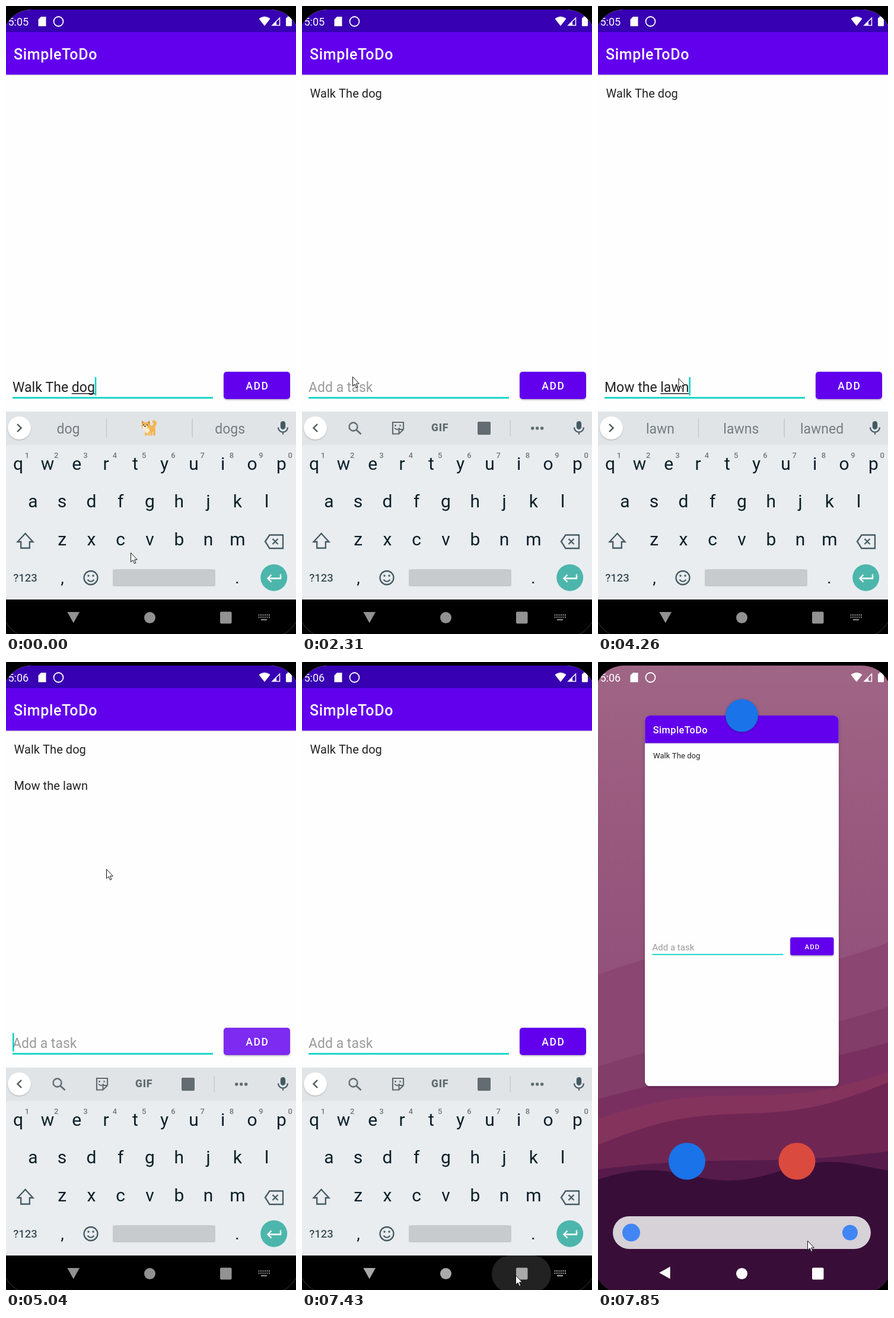
Recreate the animation shown at these times as an HTML page with a canvas. Size 489 by 1056 pixels, loop 8 s.

```html
<!DOCTYPE html>
<html lang="en">
<head>
<meta charset="utf-8">
<title>To-do list demo</title>
<style>
html, body { margin: 0; width: 100%; height: 100%; overflow: hidden; background: #000; }
canvas { display: block; width: 100vw; height: 100vh; }
</style>
</head>
<body>
<canvas id="stage" width="489" height="1056"></canvas>
<script>
const c = document.getElementById('stage').getContext('2d');
const W = 489, H = 1056, MID = 242.5, LOOP = 8000;
const PURPLE = '#6200ee', DARK = '#3700b3', TEAL = '#06d2c4';
const INK = '#455a64', GRAY = '#626c71', KEY = '#0b1f29', LINE = '#c3c8cb';

// Main events in ms
const ADD_DOG = 690, TYPE = 2870, MINUTE = 4530, ADD_LAWN = 4800;
const REMOVE = 6320, OVERVIEW = 7310, RECENTS = 7550;
const PRESSES = [540, 4650];
const TICK = 135, KEY_GAP = 140, BLINK = 525;

// Typed text and its suggestions, one stage per KEY_GAP; * marks bold
const STAGES = [
  ['M', 'M', '*My', 'Mom'],
  ['Mo', 'Mo', '*Mom', 'More'],
  ['Mow', 'Mow', 'Mowing', 'Mowed'],
  ['Mow t', 't', '*the', 'to'],
  ['Mow the', 'the', 'they', 'then'],
  ['Mow the l', 'l', '*lawn', 'last'],
  ['Mow the la', 'la', '*lawn', 'last'],
  ['Mow the lawn', 'lawn', 'lawns', 'lawned']
];
// Pointer moves: start, ticks, end point
const MOVES = [
  [150, 4, 409, 641], [810, 3, 85, 623], [4260, 4, 408, 640], [4900, 2, 169, 348],
  [5190, 5, 116, 203], [6620, 6, 360, 1031], [7685, 2, 353, 973]
];

const lerp = (a, b, u) => a + (b - a) * u;
const clamp = u => Math.max(0, Math.min(1, u));
const smooth = u => u * u * (3 - 2 * u);

function inputState(t) {
  if (t < ADD_DOG) return { typed: 'Walk The dog', words: ['dog', 'DOG', 'dogs'], since: 0 };
  if (t < TYPE) return { typed: '', since: ADD_DOG };
  if (t >= ADD_LAWN) return { typed: '', since: ADD_LAWN };
  const i = Math.min(STAGES.length - 1, Math.floor((t - TYPE) / KEY_GAP));
  const [typed, ...words] = STAGES[i];
  return { typed, words, since: TYPE + i * KEY_GAP };
}

function pointerAt(t) {
  let x = 210, y = 919;
  for (const [start, ticks, toX, toY] of MOVES) {
    const done = Math.floor((t - start) / TICK) + 1;
    const u = smooth(clamp(done / ticks));
    x = lerp(x, toX, u);
    y = lerp(y, toY, u);
  }
  return [x, y];
}

function rect(x, y, w, h, color) {
  c.fillStyle = color;
  c.fillRect(x, y, w, h);
}
function box(x, y, w, h, r, color) {
  c.beginPath();
  c.roundRect(x, y, w, h, r);
  c.fillStyle = color;
  c.fill();
}
function oval(x, y, rx, ry, color) {
  c.beginPath();
  c.ellipse(x, y, rx, ry, 0, 0, 2 * Math.PI);
  c.fillStyle = color;
  c.fill();
}
const dot = (x, y, r, color) => oval(x, y, r, r, color);
function ring(x, y, r, color, width) {
  c.beginPath();
  c.arc(x, y, r, 0, 2 * Math.PI);
  c.strokeStyle = color;
  c.lineWidth = width;
  c.stroke();
}
function fill(d, color) {
  c.fillStyle = color;
  c.fill(new Path2D(d));
}
function stroke(d, color, width) {
  c.strokeStyle = color;
  c.lineWidth = width;
  c.stroke(new Path2D(d));
}
function text(s, x, y, size, color, { weight = 400, align = 'left', gap = 0 } = {}) {
  c.font = `${weight} ${size}px Roboto, sans-serif`;
  c.letterSpacing = gap + 'px';
  c.textAlign = align;
  c.fillStyle = color;
  c.fillText(s, x, y);
}
function label(s, x, y, size, color, weight) {
  text(s, x, y, size, color, { weight, align: 'center' });
}
function withShadow(alpha, blur, dy, paint) {
  c.shadowColor = `rgba(0,0,0,${alpha})`;
  c.shadowBlur = blur;
  c.shadowOffsetY = dy;
  paint();
  c.shadowColor = 'transparent';
}

function statusBar(t) {
  text(t < MINUTE ? '5:05' : '5:06', 3.5, 33, 18, '#fff');
  fill('M59 18H67.5V34H54.5V22.5Z', '#fff');
  ring(88.5, 26, 8, '#fff', 1.8);
  fill('M436 33.5L426.5 21.5Q436 14 445.500 21.5Z', '#fff');
  stroke('M449 32.5H461.5V20Z', '#fff', 1.5);
  fill('M448 33L456 25V33Z', '#fff');
  box(472, 19.5, 10, 14.5, 1.5, '#fff');
  rect(474.5, 17.5, 5, 3, '#fff');
}

function inputField(t) {
  const { typed, since } = inputState(t);
  text(typed || 'Add a task', 11, 649, 23, typed ? '#212121' : '#9b9b9b');
  const widthOf = s => c.measureText(s).width;
  const end = 11 + widthOf(typed);
  if (typed) {
    const start = 11 + widthOf(typed.slice(0, typed.lastIndexOf(' ') + 1));
    rect(start, 651, end - start, 1.5, '#212121');
  }
  if ((t - since) % (2 * BLINK) < BLINK) rect(end, 624, 2.5, 31, TEAL);
  rect(11, 657.5, 338, 2.7, TEAL);
}

function addButton(t) {
  withShadow(.28, 3, 1.5, () => box(367, 615, 112, 46, 5, PURPLE));
  c.save();
  c.beginPath();
  c.roundRect(367, 615, 112, 46, 5);
  c.clip();
  for (const press of PRESSES) {
    const age = t - press;
    if (age < 0 || age > 690) continue;
    const alpha = .24 * clamp((690 - age) / 430);
    dot(409, 640, 40 + .6 * age, `rgba(255,255,255,${alpha})`);
  }
  c.restore();
  text('ADD', 404.3, 645, 17.5, '#fff', { weight: 500, gap: 1.56 });
}

function appContent(t) {
  rect(-60, 0, 610, 1100, '#fefefe');
  withShadow(.25, 2, 1, () => rect(-60, 44, 610, 71.4, PURPLE));
  rect(-60, 0, 610, 44, DARK);
  text('SimpleToDo', 13, 90, 25, '#fff', { weight: 500, gap: .65 });
  const items = [['Walk The dog', ADD_DOG, LOOP], ['Mow the lawn', ADD_LAWN, REMOVE]];
  items.forEach(([name, from, to], i) => {
    if (t >= from && t < to) text(name, 13.5, 154 + i * 61, 20, '#222', { gap: .06 });
  });
  inputField(t);
  addButton(t);
}

function dogIcon() {
  const fur = '#f2b653', pale = '#fff0d2', dark = '#392a20';
  c.lineCap = 'round';
  stroke('M249 707Q254 700 249 699', fur, 5);
  c.lineCap = 'butt';
  oval(243, 711, 9, 6, fur);
  for (let x = 236; x < 252; x += 4.7) box(x - 1.8, 712, 3.6, 10.5, 1.5, fur);
  oval(238, 713, 4, 5, pale);
  fill('M229 705V697L235 702ZM243 705L242 697L236 702Z', '#c98a35');
  oval(235.5, 705.5, 7, 6, fur);
  oval(234.5, 708, 4, 3.5, pale);
  for (const x of [232, 238]) dot(x, 704.5, 1, dark);
  dot(234.5, 706.8, 1.2, dark);
}

function suggestions(words) {
  words.forEach((word, i) => {
    const x = 105 + i * 136.3;
    if (i) rect(24 + i * 144.7, 694, 1.5, 31, LINE);
    if (word === 'DOG') dogIcon();
    else if (word[0] === '*') label(word.slice(1), x, 719, 23, '#000', 700);
    else label(word, x, 719, 23, '#747d82');
  });
}

function toolIcons() {
  ring(86.5, 707.5, 7, GRAY, 2.4);
  stroke('M91.5 712.5L99.5 720', GRAY, 2.8);
  stroke('M153 700H171V712L163.5 719.5H153ZM171 712H163.5V719.5', GRAY, 2.2);
  stroke('M156 709.5Q160 714.5 165 709.5', GRAY, 2);
  for (const x of [157.5, 165.5]) dot(x, 705.5, 1.4, GRAY);
  text('GIF', 218, 715, 17.5, GRAY, { weight: 900, gap: .8 });
  box(296, 699, 22, 22, 2, GRAY);
  rect(350.5, 696, 1.3, 28, LINE);
  for (let i = -1; i < 2; i++) dot(396.7 + i * 8, 710, 2.7, GRAY);
}

function keyIcons() {
  stroke('M32.5 887L45.5 901H39.8V911.5H25.2V901H19.5Z', INK, 2.3);
  stroke('M437 900.5L444.5 889.5H467V912H444.5ZM449.5 896L458.500 905M458.5 896L449.5 905', INK, 2.3);
  ring(143, 961.5, 11.5, INK, 2.3);
  for (const x of [139, 147]) dot(x, 958, 1.7, INK);
  stroke('M137.5 964.5Q143 971 148.5 964.5', INK, 2);
  dot(451.7, 961.2, 22.5, '#4db6ac');
  stroke('M463 955.5V962.5H442M447.5 956.5L441.5 962.5L447.5 968.5', '#fff', 2.4);
}

function keyboard(t, keysColor) {
  const { words } = inputState(t);
  rect(-10, 682, 520, 56, '#e1e4e7');
  rect(-10, 738, 520, 260, keysColor);
  withShadow(.25, 2, 1, () => dot(22.5, 709.5, 19.5, '#fff'));
  stroke(words ? 'M19 703L25.5 709.5L19 716' : 'M26 703L19.5 709.5L26 716', '#4c5559', 2.4);
  if (words) suggestions(words);
  else toolIcons();
  box(462.8, 698, 8.4, 14, 4.2, INK);
  stroke('M459 708.5a8 8 0 0 0 16 0M467 716.5V720.5', INK, 2.2);

  ['qwertyuiop', 'asdfghjkl', 'zxcvbnm'].forEach((letters, row) => {
    [...letters].forEach((key, i) => {
      const x = MID + (i - (letters.length - 1) / 2) * 49.3;
      label(key, x, 779.7 + row * 63.7, 30, KEY);
      if (row === 0) label((i + 1) % 10, x + 14.8, 759.5, 13, '#707a80', 500);
    });
  });
  label('?123', 32.5, 968, 18.5, '#3f5059', 500);
  label(',', 95, 971, 28, KEY);
  label('.', 390, 971, 28, KEY);
  box(180, 947, 173, 29, 3, '#c7cbce');
  keyIcons();
}

function navIcons(color, angle) {
  c.save();
  c.translate(113.7, 1027);
  c.rotate(angle);
  fill('M0 -10.500L10.3 8H-10.3Z', color);
  c.restore();
  dot(MID, 1028.5, 9.5, color);
  box(361, 1018.5, 19.5, 20, 2, color);
}

function navBar(t) {
  const pressed = t >= OVERVIEW;
  const color = pressed ? '#a9a9a9' : '#929292';
  rect(0, 998, W, 58, '#000');
  if (pressed) {
    const half = Math.min(50, 34 + (t - OVERVIEW) / 6);
    box(370 - half, 998, 2 * half, 62, 31, '#222');
  }
  navIcons(color, Math.PI);
  for (let i = 0; i < 12; i++) {
    rect(425.5 + i % 6 * 3.5, i < 6 ? 1023 : 1026.7, 2, 2, color);
  }
  rect(430, 1031, 10, 2, color);
}

// A hill line from the left height to the right one with a wave on it
function ridge(color, left, right, wave, turns) {
  c.beginPath();
  c.moveTo(0, H);
  for (let x = 0; x <= W + 4; x += 4) {
    const u = x / W;
    c.lineTo(x, lerp(left, right, u) - wave * Math.sin(u * turns * 2 * Math.PI));
  }
  c.lineTo(W, H);
  c.fillStyle = color;
  c.fill();
}

function wallpaper() {
  const sky = c.createLinearGradient(0, 0, 0, 560);
  sky.addColorStop(0, '#a06686');
  sky.addColorStop(.4, '#9a5b7f');
  sky.addColorStop(1, '#91507a');
  rect(0, 0, W, H, sky);
  ridge('#8b4771', 526, 472, 20, 1);
  ridge('#823e68', 680, 580, 8, 1);
  ridge('#793061', 735, 640, 6, 1);
  ridge('#84335c', 768, 690, 12, 1);
  ridge('#702653', 812, 707, 14, 1);
  ridge('#571b4b', 853, 823, 4, 1);
  ridge('#380e38', 870, 848, 12, 1.6);
}

function homeDock() {
  dot(150, 839.5, 31, '#1a73e8');
  dot(335.5, 839.5, 31, '#db4a3f');
  box(25, 932, 435, 55, 27.5, '#d7d1d8');
  dot(56, 959.5, 15, '#4285f4');
  dot(425, 959.5, 13, '#4285f4');
}

function recents(t) {
  // The card shrinks in two ticks, slowing down
  const rest = 1 - clamp(Math.floor((t - RECENTS) / 150) / 2);
  const fade = rest * rest, u = 1 - fade;
  const w = lerp(373, 326.5, u), x = MID - w / 2;
  const y = lerp(70, 90, u), h = lerp(803, 713, u) - y;
  const s = lerp(.749, .654, u), corner = lerp(5, 8, u);
  wallpaper();
  homeDock();

  withShadow(.2, 6, 2, () => box(x, y, w, h, corner, '#fefefe'));
  c.save();
  c.beginPath();
  c.roundRect(x, y, w, h, corner);
  c.clip();
  c.save();
  c.translate(lerp(60.6, 84.2, u), lerp(44.6, 60.9, u));
  c.scale(s, s);
  appContent(t);
  c.restore();
  c.save();
  c.globalAlpha = .68 * fade;
  c.translate(60.3, 59.3);
  c.scale(.749, .749);
  keyboard(t, '#fafafa');
  c.restore();
  c.globalAlpha = fade;
  rect(x, y + h - 12, w, 12, '#a9a9ab');
  c.restore();

  if (u) withShadow(.3, 4, 1, () => dot(MID, y, 27.5 * u, '#1a73e8'));
  box(313, 998, 115, 64, 31, `rgba(255,255,255,${.12 * rest})`);
  navIcons('#fff', -u * Math.PI / 2);
}

function pointer(t) {
  const [x, y] = pointerAt(t);
  const arrow = 'M0 0V15.5L3.6 12.3L6 18L8.4 17L6 11.5H10.8Z';
  c.save();
  c.translate(x + .5, y + .5);
  fill(arrow, '#fff');
  stroke(arrow, '#111', 1);
  c.restore();
}

function draw(t) {
  rect(0, 0, W, H, '#000');
  c.save();
  c.beginPath();
  c.roundRect(-6, 6, 501, 1056, 50);
  c.clip();
  if (t >= RECENTS) recents(t);
  else {
    appContent(t);
    keyboard(t, '#e9edf0');
    navBar(t);
  }
  statusBar(t);
  pointer(t);
  c.restore();
}

const begin = performance.now();
function tick() {
  draw((performance.now() - begin) % LOOP);
  requestAnimationFrame(tick);
}
tick();
</script>
</body>
</html>
```
